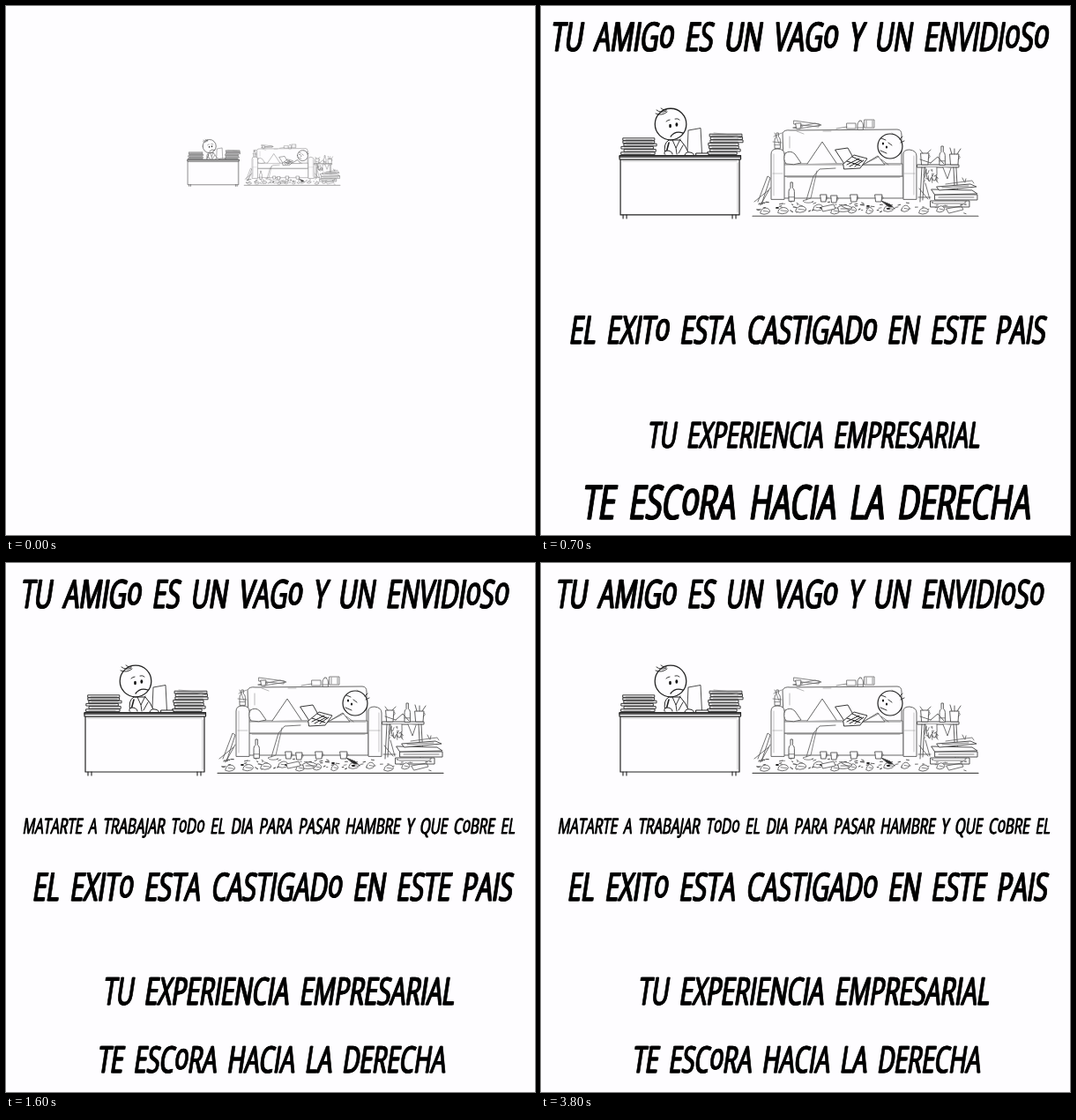
Animation, 600 px wide and 600 px high, one loop 3900 ms. Source, as an HTML page with a canvas:

```html
<!DOCTYPE html>
<html lang="es">
<head>
<meta charset="utf-8">
<style>
  html, body { margin: 0; width: 100%; height: 100%; overflow: hidden; background: #fefdff; }
  canvas { display: block; width: 600px; height: 600px; }
</style>
</head>
<body>
<canvas id="stage" width="600" height="600"></canvas>
<script>
const ctx = document.getElementById('stage').getContext('2d');
const LOOP = 3900, STEP = 100, POP = 760;
const PAPER = '#fefdff', GREY = '#8a8a8a';
const CONDENSE = 0.63, SLANT = 0.15, SPACE = 0.46;

// A lowercase o is the small raised letter of this lettering style.
const lines = [
  { text: 'TU AMIGo ES UN VAGo Y UN ENVIDIoSo', x: 294.5, y: 35, size: 44.4, start: 325 },
  { text: 'MATARTE A TRABAJAR ToDo EL DIA PARA PASAR HAMBRE Y QUE CoBRE EL', x: 299, y: 298, size: 24.1, start: 709 },
  { text: 'EL EXITo ESTA CASTIGADo EN ESTE PAIS', x: 303.5, y: 367, size: 44, start: 213 },
  { text: 'TU EXPERIENCIA EMPRESARIAL', x: 310.5, y: 486, size: 43, start: 438 },
  { text: 'TE ESCoRA HACIA LA DERECHA', x: 302.5, y: 563, size: 41.6, start: 572 }
];
const scene = { x: 292.5, y: 177.5, start: -27 };
let ink = '#222';

function elastic(u) {
  if (u <= 0) return 0;
  if (u >= 1) return 1;
  return 1 + 2 ** (-10 * u) * Math.sin((10 * u - 0.75) * 2 * Math.PI / 3);
}

function pop(item, t, draw) {
  const s = elastic((t - item.start) / POP);
  if (s <= 0) return;
  ctx.save();
  ctx.translate(item.x, item.y);
  ctx.scale(s, s);
  draw(item);
  ctx.restore();
}

function lettering({ text, size }) {
  ctx.font = `400 ${size}px "Open Sans", "Noto Sans", sans-serif`;
  ctx.fillStyle = ctx.strokeStyle = '#000';
  ctx.lineWidth = size * 0.022;
  ctx.lineJoin = 'round';
  ctx.transform(CONDENSE, 0, -SLANT, 1, 0, 0);
  const advance = c => c === ' ' ? size * SPACE : ctx.measureText(c).width;
  let x = -[...text].reduce((sum, c) => sum + advance(c), 0) / 2;
  for (const c of text) {
    const y = size * (c === 'o' ? 0.27 : 0.357);
    for (const dx of [-0.02, 0.02]) {
      ctx.fillText(c, x + dx * size, y);
      ctx.strokeText(c, x + dx * size, y);
    }
    x += advance(c);
  }
}

function path(d, { width = 1, color = ink, fill } = {}) {
  const p = new Path2D(d);
  if (fill) { ctx.fillStyle = fill; ctx.fill(p); }
  ctx.lineWidth = width;
  ctx.strokeStyle = color;
  ctx.stroke(p);
}

function box(x, y, w, h, style = { fill: PAPER }) {
  path(`M${x} ${y}h${w}v${h}h${-w}z`, style);
}

function disc(x, y, r, style = { fill: PAPER }) {
  path(`M${x - r} ${y}a${r} ${r} 0 1 0 ${2 * r} 0a${r} ${r} 0 1 0 ${-2 * r} 0`, style);
}

function dot(x, y, rx, ry) {
  ctx.fillStyle = '#111';
  ctx.beginPath();
  ctx.ellipse(x, y, rx, ry, 0, 0, 7);
  ctx.fill();
}

function random(seed) {
  return () => (seed = (seed * 16807) % 2147483647) / 2147483647;
}

function stack(x, bottom, width, count, gap, seed) {
  const rnd = random(seed);
  for (let i = 0; i < count; i++) {
    const left = x + rnd() * 4, y = bottom - (i + 1) * gap;
    box(left, y, width - rnd() * 4, gap - 0.6, { fill: PAPER, width: 0.9 });
    path(`M${left + 3} ${y + gap / 2}h${width - 9}`, { width: 0.6, color: GREY });
  }
}

function bottle(x, bottom, h) {
  path(`M${x - 3} ${bottom}v${-h * 0.5}q0 -3 2 -4v${-h * 0.5 + 4}h2.4v${h * 0.5 - 4}q2 1 2 4v${h * 0.5}z`,
    { fill: PAPER, width: 0.9 });
  path(`M${x - 3} ${bottom - h * 0.2}h6`, { width: 0.7 });
}

function cup(x, bottom, w = 7, h = 8) {
  path(`M${x} ${bottom - h}h${w}l-1 ${h}h${2 - w}z`, { fill: PAPER, width: 0.9 });
  path(`M${x + w} ${bottom - h + 2}q3 1 -0.5 4`, { width: 0.7 });
}

function worker() {
  path('M166 164L167 141L181 138.5L182.5 168', { fill: PAPER, width: 0.8 });
  path('M141 168Q138 156 145 152H158Q164 158 168 168', { fill: PAPER });
  path('M149 152l4 9l5 -10M153 161l1 7M161 158l-5 9', { width: 0.9 });
  disc(147, 134, 17.8, { fill: PAPER, width: 1.3 });
  path('M131 118q5 4 11 1M130 122q7 3 13 -2M136 116q3 3 6 2', { width: 0.9 });
  dot(146.5, 136, 1.4, 2.2);
  dot(153.8, 134.5, 1.4, 2.2);
  path('M142 131q2 -2 4 -2M152 128q3 -1 5 1', { width: 0.9 });
  path('M147 148q5 -7 14 -4', { width: 1.3 });
  path('M145 155l-3 11', { width: 1.6 });
  path('M140 168q-1 -4 4 -4q5 1 5 4M163 169q1 -4 6 -3q5 1 4 3', { fill: PAPER });
}

function desk() {
  worker();
  stack(91, 169, 39, 6, 3.2, 17);
  stack(189, 169, 37, 7, 3.4, 91);
  path('M196 144l31 3M193 147l30 -1M210 146l18 4', { width: 0.7, color: GREY });
  box(176, 167, 14, 3);
  box(90, 174, 135, 63, { fill: PAPER, width: 1.2 });
  box(89, 169.5, 137.5, 4.5, { fill: PAPER, width: 1.2 });
  path('M89 171H226', { width: 1.5 });
  path('M92 176H222M223 178V234', { width: 0.5, color: GREY });
  path('M93 237v4M97 237v4M217 237v4M221 237v4', { width: 1.1 });
}

function sofa() {
  path('M275 179L274 144Q276 140 283 141L404 140Q409 140 409 146V180', { fill: PAPER });
  path('M286 138l25 -5l7 2l-25 4zM287 130l29 4l-1 3l-28 -3z', { fill: PAPER, width: 0.8 });
  cup(289, 139, 6, 6);
  box(347, 133, 10, 6, { fill: PAPER, width: 0.8 });
  bottle(362, 140, 10);
  box(367, 129, 11, 9, { fill: PAPER, width: 0.8 });
  path('M369 130v7M376 130v7M335 139l12 -2', { width: 0.7 });
  box(275, 193, 136, 25);
  box(274, 179, 136, 14);
  path('M276 180.5h132M279 194.5h128', { width: 0.5, color: GREY });
  path('M261 219V168Q261 162 268 162Q276 162 276 168V219z', { fill: PAPER });
  path('M411 219V168Q411 163 418 163Q426 164 426 170V219z', { fill: PAPER });
  path('M264 168v47M423 170v44M263 190h11M412 190h12', { width: 0.5, color: GREY });
  bottle(268, 161, 17);
  path('M264 148l9 -4M263 154l10 1M265 144l5 12', { width: 0.7 });
  path('M277 167q6 -4 11 1l7 10q-8 3 -17 1q-4 -5 -1 -12z', { fill: PAPER });
  path('M290 142l8 3M398 144l7 5M320 142h9M282 148v13', { width: 0.6, color: GREY });
}

function reader() {
  path('M302 179L319 154L335 178', { fill: PAPER });
  path('M334 184L316 185L309 193L301 220', { width: 0.9 });
  path('M313 187L306 218L297 221q2 3 9 2', { width: 0.8 });
  path('M364 181L382 170L390 180H365z', { fill: PAPER });
  path('M369 178l14 -7M386 174l8 6', { width: 0.8 });
  ink = '#222';
  disc(396, 159, 14, { fill: PAPER, width: 1.2 });
  dot(388, 156, 1.1, 1.5);
  dot(392, 160, 1.1, 1.5);
  path('M386 150l5 2M394 155l4 3M385 164l7 3M407 151l3 -3M408 155l4 -2', { width: 0.9 });
  path('M334 163l14 -2l9 16l-12 3z', { fill: PAPER, width: 0.9 });
  path('M343 179l12 -10l15 4l-8 11l-18 1z', { fill: PAPER, width: 0.9 });
  path('M347 180l14 -7M350 182l13 -7M356 182l10 -7M347 176l15 5M353 171l11 5');
}

function sideTable() {
  box(427, 180, 47, 3);
  path('M432 183L430 222M435 183l-2 37M468 183l2 38M471 183l2 37', { width: 0.9 });
  cup(431, 180, 9, 13);
  path('M433 167l-3 -4M438 167l4 -4M430 174l12 4', { width: 0.8 });
  bottle(455, 180, 21);
  cup(464, 180, 10, 12);
  path('M466 168l-2 -7M469 168v-6M472 168l4 -6M442 178l8 -7l7 8', { width: 0.9 });
  path('M436 183q1 14 5 16q2 -9 4 -1q5 2 4 -15M456 183l5 13l4 -12', { fill: PAPER, width: 0.8 });
  const rnd = random(53);
  for (let i = 0; i < 22; i++) {
    path(`M${436 + rnd() * 14} ${184 + rnd() * 14}l${rnd() * 5 - 2} ${rnd() * 5}`, { width: 0.7 });
  }
}

function piles() {
  box(442, 221, 44, 7);
  box(447, 214, 48, 6);
  path('M443 208l46 1l6 4l-48 1z', { fill: PAPER });
  path('M449 205L487 202L494 205L452 209z', { fill: PAPER });
  path('M446 224h36M451 217h40M455 206l30 -2M459 202l30 -4l2 3', { width: 0.7 });
  path('M478 195l2 4M482 196l-1 4M429 207l10 12M436 201l5 18M428 217h14', { width: 0.8 });
  path('M246 222L257 193L260 195L251 222M242 222l16 -13M249 226l11 -20', { width: 0.8 });
}

function litter() {
  const rnd = random(2024);
  const style = { fill: PAPER, width: 0.8 };
  for (let i = 0; i < 75; i++) {
    const x = 243 + rnd() * 240, y = 222 + rnd() * 13;
    path(`M${x} ${y}l${1 + rnd() * 3} ${rnd() * 2 - 1}`, { width: 0.6 + rnd() * 0.6 });
  }
  for (let i = 0; i < 11; i++) {
    const x = 250 + i * 20, y = 227 + rnd() * 5, w = 5 + rnd() * 5;
    path(`M${x} ${y}q${w / 2} -4 ${w} -1q3 3 -1 5q${-w / 2} 2 ${-w} 0z`, style);
    path(`M${x + 2} ${y + 1}l${w - 2} 1`, { width: 0.7 });
  }
  for (const x of [268, 318, 345, 371, 394]) dot(x, 226 + (x % 5), 2, 0.9);
  path('M386 221l10 4l3 3l-4 0z', { fill: '#222' });
  bottle(284, 221, 21);
  cup(317, 222);
  cup(329, 223);
  cup(351, 222, 8, 8);
  cup(379, 222, 8, 8);
  path('M318 228l14 -3l2 5l-14 3zM337 228q8 -5 16 1q-5 6 -15 4z', style);
  path('M340 230h11M341 227l8 4M460 230l17 -3l2 4l-16 4z', { width: 0.8 });
  path('M240 238.3H496', { width: 1.2 });
}

function drawing() {
  ctx.translate(-scene.x, -scene.y);
  ctx.lineCap = ctx.lineJoin = 'round';
  ink = '#222';
  desk();
  ink = '#666';
  sofa();
  reader();
  ink = '#505050';
  sideTable();
  piles();
  litter();
}

function frame(now) {
  const t = Math.floor((now % LOOP) / STEP) * STEP;
  ctx.fillStyle = PAPER;
  ctx.fillRect(0, 0, 600, 600);
  pop(scene, t, drawing);
  for (const line of lines) pop(line, t, lettering);
  requestAnimationFrame(() => frame(performance.now() - began));
}

const began = performance.now();
frame(0);
</script>
</body>
</html>
```
